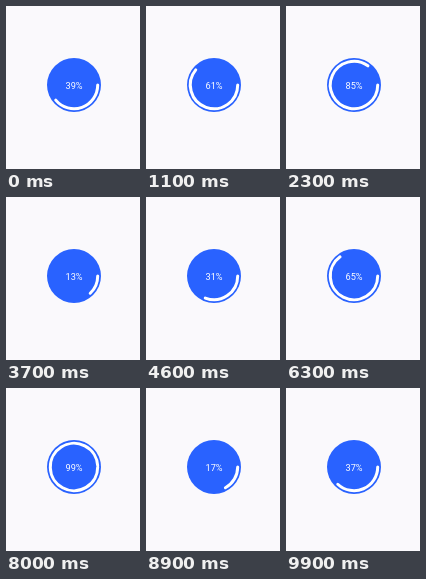
Animation, 134 px wide and 163 px high, one loop 10 s. Source, as an HTML page:

```html
<!DOCTYPE html>
<html lang="en">
<head>
<meta charset="utf-8">
<title>Circular progress</title>
<style>
html, body { margin: 0; width: 100%; height: 100%; overflow: hidden; background: #faf9fc; }
svg { display: block; }
text { font: 9.2px Roboto, sans-serif; fill: #fff; text-anchor: middle; }
</style>
</head>
<body>
<svg width="134" height="163" viewBox="0 0 134 163">
  <circle cx="68" cy="79" r="27" fill="#2962ff"/>
  <path id="arc" fill="none" stroke="#fff" stroke-width="3" stroke-linecap="round"/>
  <text id="label" x="68" y="82.5"></text>
</svg>
<script>
const CX = 68, CY = 79, R = 23.7;
const STEP = 100, LOOP = 10000, START = 39;
const arc = document.getElementById('arc');
const label = document.getElementById('label');
const t0 = performance.now();

function draw() {
  const time = (performance.now() - t0) % LOOP;
  const percent = (START + 2 * Math.floor(time / STEP)) % 100;
  const angle = percent / 100 * 2 * Math.PI;
  const x = CX + R * Math.cos(angle);
  const y = CY + R * Math.sin(angle);
  arc.setAttribute('d', `M${CX + R} ${CY}A${R} ${R} 0 ${percent > 50 ? 1 : 0} 1 ${x} ${y}`);
  label.textContent = percent + '%';
  requestAnimationFrame(draw);
}
draw();
</script>
</body>
</html>
```
